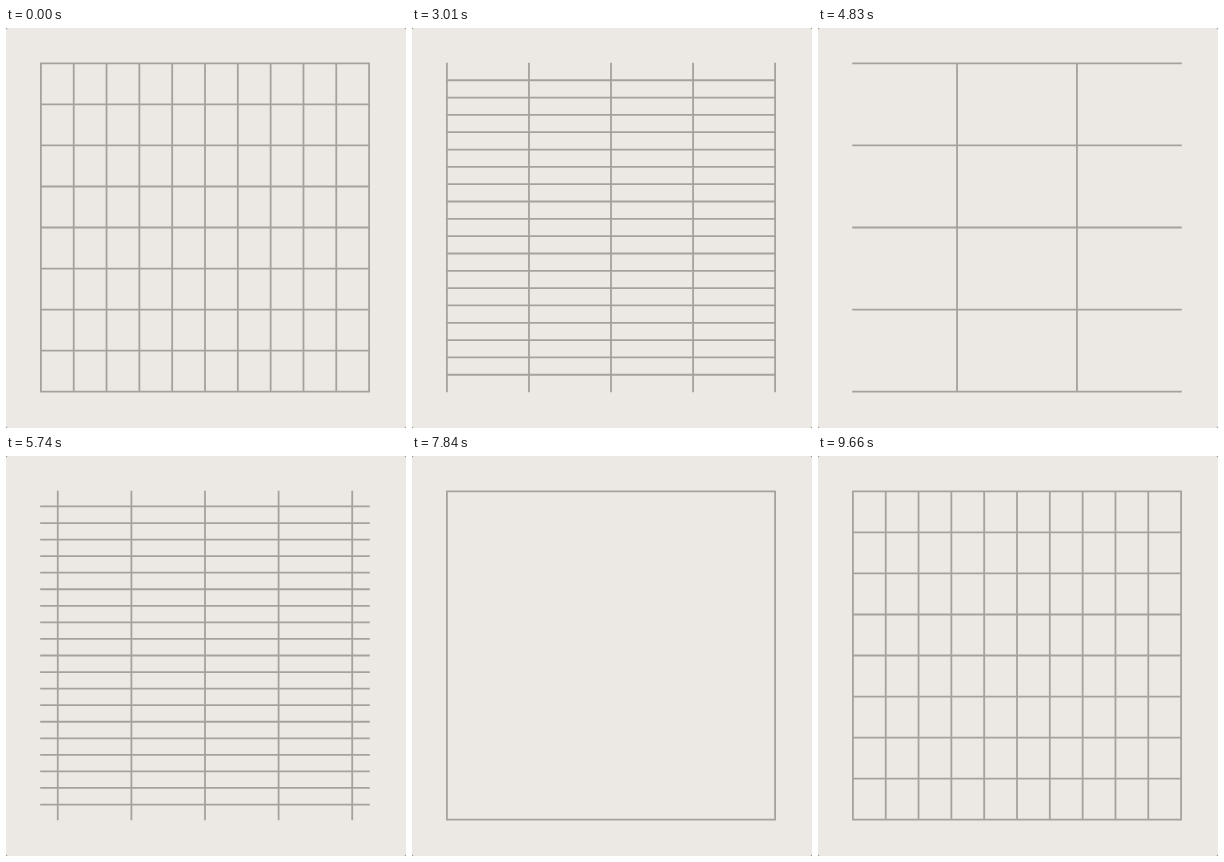
An HTML page with a canvas for the animation above (9.73 s loop, 400 px wide and 400 px high).

```html
<!DOCTYPE html>
<html lang="en">
<head>
<meta charset="utf-8">
<title>Shifting grid</title>
<style>
  html, body { margin: 0; width: 100%; height: 100%; overflow: hidden; background: #77756f; }
  canvas { display: block; background: #ece9e4; border-radius: 2px; }
</style>
</head>
<body>
<canvas id="stage" width="400" height="400"></canvas>
<script>
const ctx = document.getElementById('stage').getContext('2d');
const LOOP = 9730, STEP = 70, LAG = 87;
const CX = 199, CY = 199.5, HALF = 164.1, REACH = 164.8;

// One grid per beat: [columns, rows]
const grids = [[10, 8], [6, 23], [1, 19], [4, 19], [6, 14], [3, 4], [6, 20], [2, 6], [1, 1], [17, 6]];
const BEAT = LOOP / grids.length;

const ease = p => (1 - Math.cos(Math.PI * p)) / 2;

// The later grids rest longer, and the last move ends before the loop does.
const leave = k => k * BEAT + (k > 5 ? 280 : 76);
const arrive = k => Math.min(k * BEAT - 40, LOOP - STEP - LAG);

// Cell count of one axis; a change between odd and even passes through zero.
function cellsAt(axis, t) {
  const k = Math.max(0, Math.min(grids.length - 1, Math.floor((t + 40) / BEAT)));
  // A move belongs to the grid it leaves, so step back while resting early in a beat.
  const from = grids[k][axis], to = grids[(k + 1) % grids.length][axis];
  const p = Math.max(0, Math.min(1, (t - leave(k)) / (arrive(k + 1) - leave(k))));
  if (from % 2 === to % 2) return { n: from + (to - from) * ease(p), odd: to % 2 };
  return p < 0.5
    ? { n: from * ease(1 - 2 * p), odd: from % 2 }
    : { n: to * ease(2 * p - 1), odd: to % 2 };
}

// Offsets of the visible lines, mirrored about the centre
function offsets({ n, odd }) {
  const out = odd ? [] : [0];
  if (n < 0.01) return out;
  const gap = 2 * HALF / n;
  for (let d = odd ? gap / 2 : gap; d <= HALF + 0.01; d += gap) out.push(-d, d);
  return out;
}

function draw(t) {
  ctx.clearRect(0, 0, 400, 400);
  ctx.beginPath();
  for (const d of offsets(cellsAt(0, t - LAG))) {
    ctx.moveTo(CX + d, CY - REACH);
    ctx.lineTo(CX + d, CY + REACH);
  }
  for (const d of offsets(cellsAt(1, t))) {
    ctx.moveTo(CX - REACH, CY + d);
    ctx.lineTo(CX + REACH, CY + d);
  }
  ctx.lineWidth = 1.8;
  ctx.strokeStyle = '#a5a29d';
  ctx.stroke();
}

function tick() {
  draw(Math.floor(performance.now() % LOOP / STEP) * STEP);
  requestAnimationFrame(tick);
}
tick();
</script>
</body>
</html>
```
